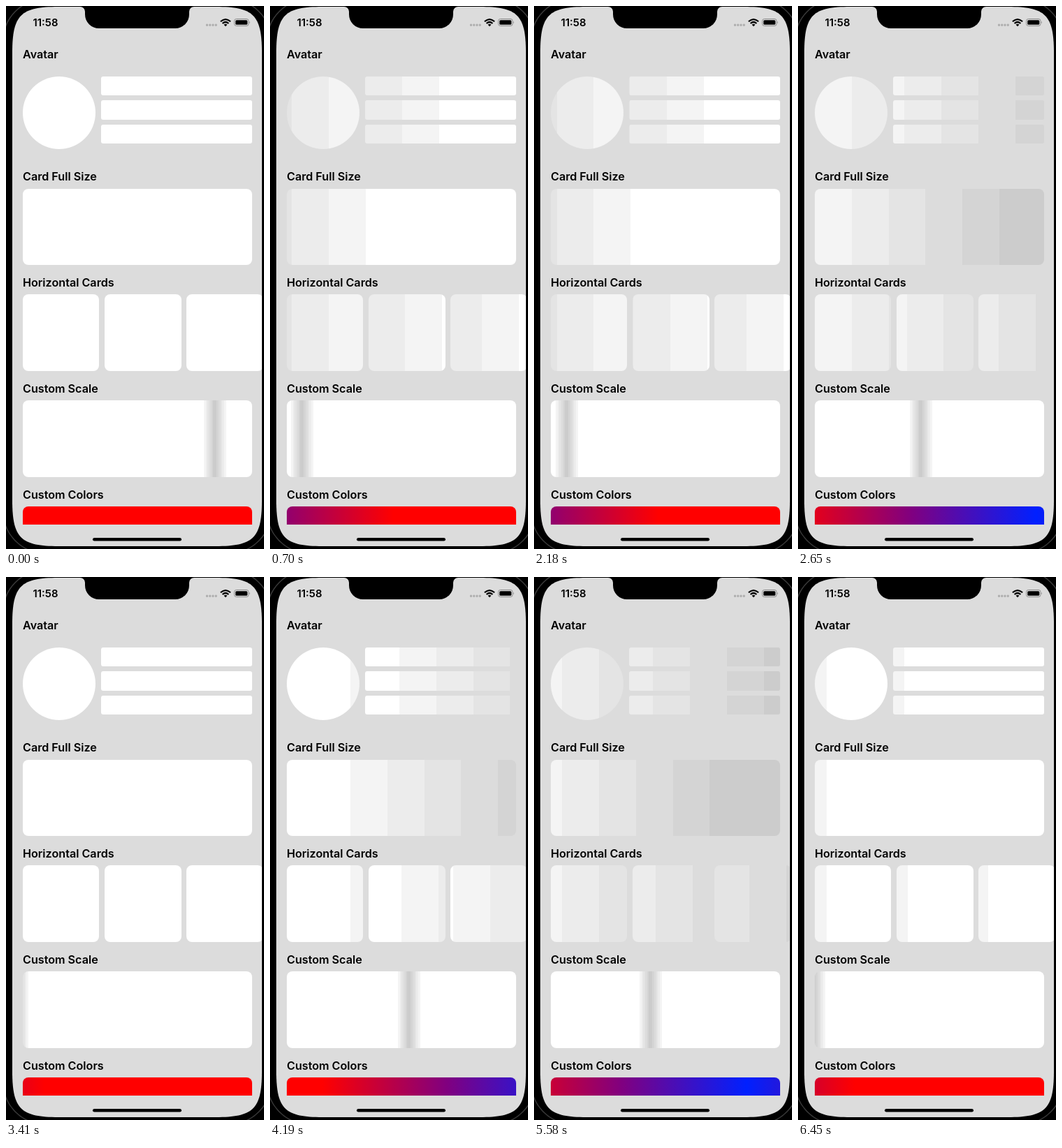
Animation, 369 px wide and 778 px high, one loop 6.55 s. Source, as an HTML page:

```html
<!DOCTYPE html>
<html lang="en">
<head>
<meta charset="utf-8">
<title>Shimmer placeholders</title>
<style>
  html, body { margin: 0; width: 100%; height: 100%; overflow: hidden; background: #000; }
  #stage { position: relative; width: 369px; height: 778px; overflow: hidden; background: #000; }
  #screen { position: absolute; left: 0; top: 0; width: 366px; height: 743px; overflow: hidden; }
  h2 {
    position: absolute; left: 24px; margin: 0; white-space: nowrap;
    font: 600 16.15px/20px Inter, "Liberation Sans", sans-serif; color: #000;
  }
  .shim {
    position: absolute; border-radius: 8px;
    background-color: #fff; background-repeat: no-repeat;
  }
  .round { border-radius: 50%; }
  .line { border-radius: 3px; }
  .color { background-color: #f00; }
  svg { position: absolute; left: 0; top: 0; }
  svg text { font: 600 14.9px Inter, "Liberation Sans", sans-serif; }
</style>
</head>
<body>
<div id="stage">
  <svg width="369" height="778">
    <rect x="-4" y="-10" width="383" height="794" rx="60" fill="none" stroke="#3a3a3a" stroke-width="1.5"/>
    <path id="glass" fill="#dcdcdc"/>
  </svg>
  <div id="screen"></div>
  <svg width="369" height="778">
    <path d="M106 0V1A7 7 0 0 1 113 8V12A20 20 0 0 0 133 32H242A20 20 0 0 0 262 12V8A7 7 0 0 1 269 1V0Z"/>
    <text x="38.500" y="29">11:58</text>
    <path d="M287.500 27.300H301" stroke="#aeaeae" stroke-width="3.400" stroke-linecap="round" stroke-dasharray="0 4.250"/>
    <g fill="none" stroke="#000" stroke-width="2.200">
      <path d="M306.900 22.300Q314 15.800 321.100 22.300"/>
      <path d="M309.600 25Q314 21 318.400 25"/>
    </g>
    <path d="M311.600 26.700Q314 24.700 316.400 26.700L314 29.200Z"/>
    <rect x="326.500" y="18.500" width="20.500" height="10" rx="3" fill="none" stroke="#8c8c8c"/>
    <rect x="328.200" y="20.200" width="17.100" height="6.600" rx="1.600"/>
    <path d="M348 21.800Q349.700 23.500 348 25.200Z" fill="#8c8c8c"/>
    <rect x="124" y="762" width="127" height="4.600" rx="2.300"/>
  </svg>
</div>
<script>
  const LOOP = 6550, SWEEP = 1478, FIRST = 418;
  const HALF = 357, LEFT = 23.6, WIDE = 328;
  const screen = document.getElementById("screen");
  const parts = [];

  // Screen outline with smooth corners: span r, control offset c
  function outline(l, t, r, b, span, c) {
    const corner = (x1, y1, x2, y2, x3, y3) => `C${x1} ${y1} ${x2} ${y2} ${x3} ${y3}`;
    return `M${l} ${t + span}` + corner(l, t + c, l + c, t, l + span, t) +
      `H${r - span}` + corner(r - c, t, r, t + c, r, t + span) +
      `V${b - span}` + corner(r, b - c, r - c, b, r - span, b) +
      `H${l + span}` + corner(l + c, b, l, b - c, l, b - span) + "Z";
  }
  document.getElementById("glass").setAttribute("d", outline(9, 1, 366, 774, 66, 11.9));

  // Flat grey steps, darkest in the middle, white at both ends
  function greyBand(half) {
    const step = half * 0.148, stops = [];
    for (let i = -5; i <= 5; i++) {
      const g = 204 + 8 * Math.abs(i);
      const from = i > 0 ? i : i - 1, to = i < 0 ? i : i + 1;
      stops.push(`rgb(${g},${g},${g}) ${half + from * step}px ${half + to * step}px`);
    }
    const edge = 6 * step;
    return `linear-gradient(90deg, #fff ${half - edge}px, ${stops.join()}, #fff ${half + edge}px)`;
  }
  const colorBand = "linear-gradient(90deg, #f00, #800080, #0020ff, #800080, #f00)";

  function addTitle(text, y) {
    const h = document.createElement("h2");
    h.textContent = text;
    h.style.top = y + "px";
    screen.append(h);
  }

  function addShim(kind, x, y, w, h, scale = 1) {
    const el = document.createElement("div"), half = HALF * scale;
    el.className = "shim " + kind;
    el.style.cssText = `left:${x}px;top:${y}px;width:${w}px;height:${h}px`;
    el.style.backgroundImage = kind === "color" ? colorBand : greyBand(half);
    el.style.backgroundSize = 2 * half + "px 100%";
    screen.append(el);
    parts.push({ el, from: 8 - 338 * scale - half, travel: 440 + 1570 * scale - x });
  }

  addTitle("Avatar", 59);
  addShim("round", LEFT, 100.5, 104.5, 104.5);
  for (let i = 0; i < 3; i++) addShim("line", 135.5, 100.5 + 34.7 * i, 216, 27.5);

  const titles = ["Card Full Size", "Horizontal Cards", "Custom Scale", "Custom Colors"];
  titles.forEach((title, i) => {
    const y = 261.5 + 151.75 * i;
    addTitle(title, 234 + 152 * i);
    if (title === "Horizontal Cards") {
      for (let n = 0; n < 3; n++) addShim("card", LEFT + 117.2 * n, y, 109.8, 109.8);
    } else {
      addShim(title === "Custom Colors" ? "color" : "card", LEFT, y, WIDE, 109.8,
        title === "Custom Scale" ? 0.05 : 1);
    }
  });

  const born = performance.now();
  function draw() {
    const time = Math.max(0, performance.now() - born) % LOOP;
    const phase = (time - FIRST + SWEEP) % SWEEP / SWEEP;
    const eased = phase ** 1.67;
    for (const p of parts) {
      p.el.style.backgroundPosition = (p.from + p.travel * eased).toFixed(2) + "px 0";
    }
    requestAnimationFrame(draw);
  }
  draw();
</script>
</body>
</html>
```
